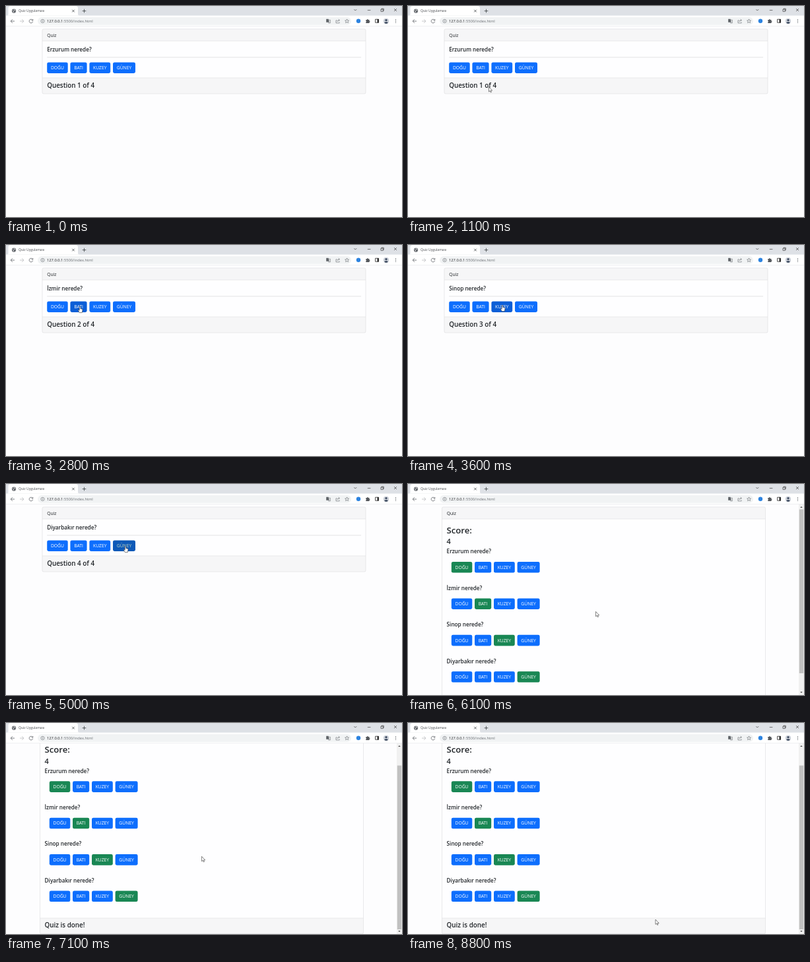
Recreate the animation shown at these times as an HTML page. Size 600 by 320 pixels, loop 9.1 s.

```html
<!DOCTYPE html>
<html lang="tr">
<head>
<meta charset="utf-8">
<title>Quiz</title>
<style>
  html, body { margin: 0; width: 100%; height: 100%; overflow: hidden; background: #fdfdfe; }
  svg { display: block; width: 600px; height: 320px; font-family: "Open Sans", "Noto Sans", sans-serif; }
  text { fill: #212529; font-size: 6.75px; }
  .h { font-weight: 600; font-size: 8.2px; }
  .h4 { font-weight: 600; font-size: 9.85px; }
  .btn text { fill: #fff; text-anchor: middle; }
  .icon { fill: none; stroke: #5f6368; stroke-width: .8; }
  .line { stroke: #dcdcde; stroke-width: .6; fill: none; }
</style>
</head>
<body>
<svg viewBox="0 0 600 320">
  <rect width="600" height="320" fill="#fdfdfe"/>
  <g id="quiz"></g>
  <g id="score"></g>
  <g id="bar">
    <rect x="592" y="30" width="8" height="290" fill="#f1f1f1"/>
    <rect id="thumb" x="592.8" width="6.4" height="248.5" fill="#c1c1c1"/>
    <path d="M594.2 36l1.8-2 1.8 2zM594.2 315l1.8 2 1.8-2z" fill="#505050"/>
  </g>

  <g id="chrome">
    <rect width="600" height="15" fill="#dee1e6"/>
    <path d="M0 14.5H600V30.5H0z" fill="#fff"/>
    <path d="M1 14.6Q3.5 14.6 3.5 12V3.5Q3.5 0 7 0H106Q109 0 109 3.5V12Q109 14.6 112 14.6z" fill="#fff"/>
    <path d="M0 30.5H600" stroke="#dfe1e4" stroke-width=".5"/>
    <circle cx="12" cy="7.5" r="3.1" fill="#5f6368"/>
    <path d="M9.6 6.8l2 1.2-.3 1.6M12 4.9l.4 1.4 1.9.7" stroke="#fff" stroke-width=".8" fill="none"/>
    <text x="19" y="9.3" style="font-size:5.05px;fill:#45484c">Quiz Uygulaması</text>
    <path class="icon" d="M100.2 5.7l3.6 3.6m0-3.6l-3.6 3.6M118.5 4.7v5.6M115.7 7.5h5.6" style="stroke:#3c4043"/>
    <path class="icon" d="M527.3 5l2 2 2-2M547.8 6.4h4.6M568 5h3.3v3.3H568zM569 5V4h3.3v3.3h-1M588 4l4 4m0-4l-4 4" style="stroke:#333;stroke-width:.65"/>
    <rect x="48" y="17" width="475" height="11.8" rx="5.9" fill="#f1f3f4"/>
    <path class="icon" d="M13 23H7.2m2.7-2.8L7.1 23l2.8 2.8"/>
    <path class="icon" d="M21 23h5.8m-2.7-2.8l2.8 2.8-2.8 2.8" style="stroke:#b9bbbe"/>
    <path class="icon" d="M40.2 21.3a2.8 2.8 0 1 0 .5 2.3M40.8 20v2h-2.1"/>
    <circle class="icon" cx="55.5" cy="22.9" r="2.6" style="stroke-width:.6"/>
    <path class="icon" d="M55.5 22.5v1.7M55.5 21.2v.6" style="stroke-width:.7"/>
    <text x="62" y="25" style="font-size:5.77px;fill:#202124">127.0.0.1<tspan fill="#6b6f74">:5500/index.html</tspan></text>
    <path d="M485.2 19.8h3.4l1.2 5h-4.6z" fill="#5f6368"/>
    <path class="icon" d="M489 21.2h2.3v4.6h-3.1M486 22.3h1.7" style="stroke-width:.6"/>
    <path class="icon" d="M501.6 21.8H500v4h5.2v-1.4M501.8 24q.3-2.5 3.2-2.5m-1.2-1.5l1.7 1.6-1.7 1.6" style="stroke-width:.6"/>
    <path class="icon" d="M516.6 19.9l.9 2 2.1.2-1.6 1.4.5 2.1-1.9-1.1-1.9 1.1.5-2.1-1.6-1.4 2.1-.2z" style="stroke-width:.6"/>
    <circle cx="534" cy="22.7" r="3.2" fill="#2c83e0"/>
    <path d="M545.3 21h1.6a1 1 0 0 1 2 0h1.6v1.7a1 1 0 0 1 0 2v1.4h-5.2v-1.7a.9.9 0 0 0 0-1.7z" fill="#54585d"/>
    <path d="M559.6 20.2h5v5h-5z" fill="none" stroke="#222" stroke-width=".8"/>
    <path d="M562.6 20h2v5.4h-2z" fill="#222"/>
    <circle cx="576" cy="22.8" r="4.1" fill="#c9ced6"/>
    <circle cx="576" cy="21.6" r="1.5" fill="#36445a"/>
    <path d="M573 25.5q3-3.2 6 0-3 2.6-6 0z" fill="#36445a"/>
    <g fill="#5f6368"><circle cx="590.5" cy="20.7" r=".65"/><circle cx="590.5" cy="22.9" r=".65"/><circle cx="590.5" cy="25.1" r=".65"/></g>
  </g>

  <g id="cursor" stroke="#333" stroke-width=".6" fill="#fff" stroke-linejoin="round">
    <path id="arrow" d="M0 0V7.4L1.7 5.9 2.8 8.4 4 7.9 2.9 5.5H5.2z"/>
    <path id="hand" d="M-.8.8Q0-.5.8.8V3.6L3.2 4.1Q4.2 4.4 4 5.6L3.3 9.6H-.7L-2.6 6.3Q-2.7 5.2-1.6 5.6L-.8 6.3z"/>
  </g>
</svg>

<script>
const $ = id => document.getElementById(id);
const LOOP = 9100, SCROLL = 29.7;
const BLUE = '#0d6efd', HOVER = '#0b5ed7', GREEN = '#198754';
const cities = ['Erzurum', 'İzmir', 'Sinop', 'Diyarbakır'];
const labels = ['DOĞU', 'BATI', 'KUZEY', 'GÜNEY'];
const spans = [[62.2, 31.5], [97.4, 25.2], [126.4, 31.8], [162, 34]];
const clicks = [2000, 3000, 3800, 5000];
const BTN_Y = 85.4, BTN_H = 16.6;

// Pointer stops: time, x, y
const path = [
  [400, 250, 224], [1300, 104, 108], [1800, 81, 94], [2100, 81, 94], [2700, 112, 93],
  [3000, 112, 93], [3500, 143, 91], [3900, 143, 91], [4700, 181, 94], [5600, 181, 94],
  [6100, 284.5, 193.5], [6400, 293, 198], [7000, 293, 198], [7800, 375.3, 299.6],
  [8400, 375.3, 299.6], [8500, 375, 298]
];

const text = (x, y, s, cls = '') => `<text x="${x}" y="${y}" class="${cls}">${s}</text>`;

const buttons = (dx, y, right = -1) => labels.map((label, i) => {
  const [x, w] = spans[i];
  return `<g class="btn"><rect x="${x + dx}" y="${y}" width="${w}" height="${BTN_H}" rx="2.4"
    fill="${i === right ? GREEN : BLUE}"/>${text(x + dx + w / 2, y + 10.7, label)}</g>`;
}).join('');

const card = (x, footY, bottom) => `
  <rect x="${x}" y="35" width="490" height="${bottom - 35}" rx="2" fill="#fefeff"/>
  <path d="M${x} 35h490v18h-490zM${x} ${footY}h490V${bottom}h-490z" fill="#f6f6f7"/>
  <path class="line" d="M${x} 53h490M${x} ${footY}h490"/>
  <rect class="line" x="${x}" y="35" width="490" height="${bottom - 35}" rx="2"/>
  ${text(x + 7.2, 46.6, 'Quiz')}`;

$('quiz').innerHTML = card(55, 109, 133) +
  '<path d="M62.2 77.8H538" stroke="#cfcfd2" stroke-width=".6"/>' +
  '<text id="question" class="h" x="62.2" y="69"/><text id="count" class="h4" x="62.2" y="123.5"/>' +
  buttons(0, BTN_Y);

$('score').innerHTML = card(51.5, 325.7, 349.4) +
  `<g style="font-weight:600"><text x="58.5" y="74.5" style="font-size:13.15px">Score:</text>
   <text x="58.5" y="91.4" style="font-size:11px">4</text></g>` +
  cities.map((city, i) =>
    text(58.6, 105.4 + 55.4 * i, city + ' nerede?', 'h') + buttons(3.6, 118 + 55.4 * i, i)).join('') +
  text(58.6, 340, 'Quiz is done!', 'h4');

const quizButtons = [...$('quiz').querySelectorAll('.btn')];
const show = (id, on) => $(id).setAttribute('display', on ? 'inline' : 'none');
const smooth = p => p * p * (3 - 2 * p);
const clamp = p => Math.max(0, Math.min(1, p));

function pointerAt(t) {
  const n = path.findIndex(stop => stop[0] > t);
  if (n < 0) return path[path.length - 1].slice(1);
  if (n === 0) return path[0].slice(1);
  const [t0, x0, y0] = path[n - 1], [t1, x1, y1] = path[n];
  const p = smooth((t - t0) / (t1 - t0));
  return [x0 + (x1 - x0) * p, y0 + (y1 - y0) * p];
}

function draw(t) {
  const done = t >= 5100;
  const [x, y] = pointerAt(t);
  const step = Math.min(3, clicks.filter(c => t >= c + 100).length);
  const pressed = t >= clicks[step] && t < clicks[step] + 100;
  const visible = t >= 400;
  const over = visible && !done && y >= BTN_Y && y <= BTN_Y + BTN_H
    ? spans.findIndex(([left, w]) => x >= left && x <= left + w) : -1;

  show('quiz', !done);
  show('score', done);
  show('bar', done);
  show('cursor', visible);
  show('hand', over >= 0);
  show('arrow', over < 0);
  $('cursor').setAttribute('transform', `translate(${x} ${y})`);

  $('question').textContent = cities[step] + ' nerede?';
  $('count').textContent = `Question ${step + 1} of 4`;
  quizButtons.forEach((btn, i) => {
    const hit = pressed && i === over;
    const last = step === 3;
    btn.firstChild.setAttribute('fill', hit ? (last ? '#0d59b8' : '#167c4b') : i === over ? HOVER : BLUE);
    btn.lastChild.style.fill = hit ? (last ? '#c3d9bf' : '#a9cdb8') : '#fff';
  });

  const scrolled = smooth(clamp((t - 6100) / 300));
  $('score').setAttribute('transform', `translate(0 ${-SCROLL * scrolled})`);
  $('thumb').setAttribute('y', 38.5 + 26 * scrolled);
}

function tick(now) {
  draw(Math.floor(now % LOOP / 100) * 100);
  requestAnimationFrame(tick);
}
tick(performance.now());
</script>
</body>
</html>
```
